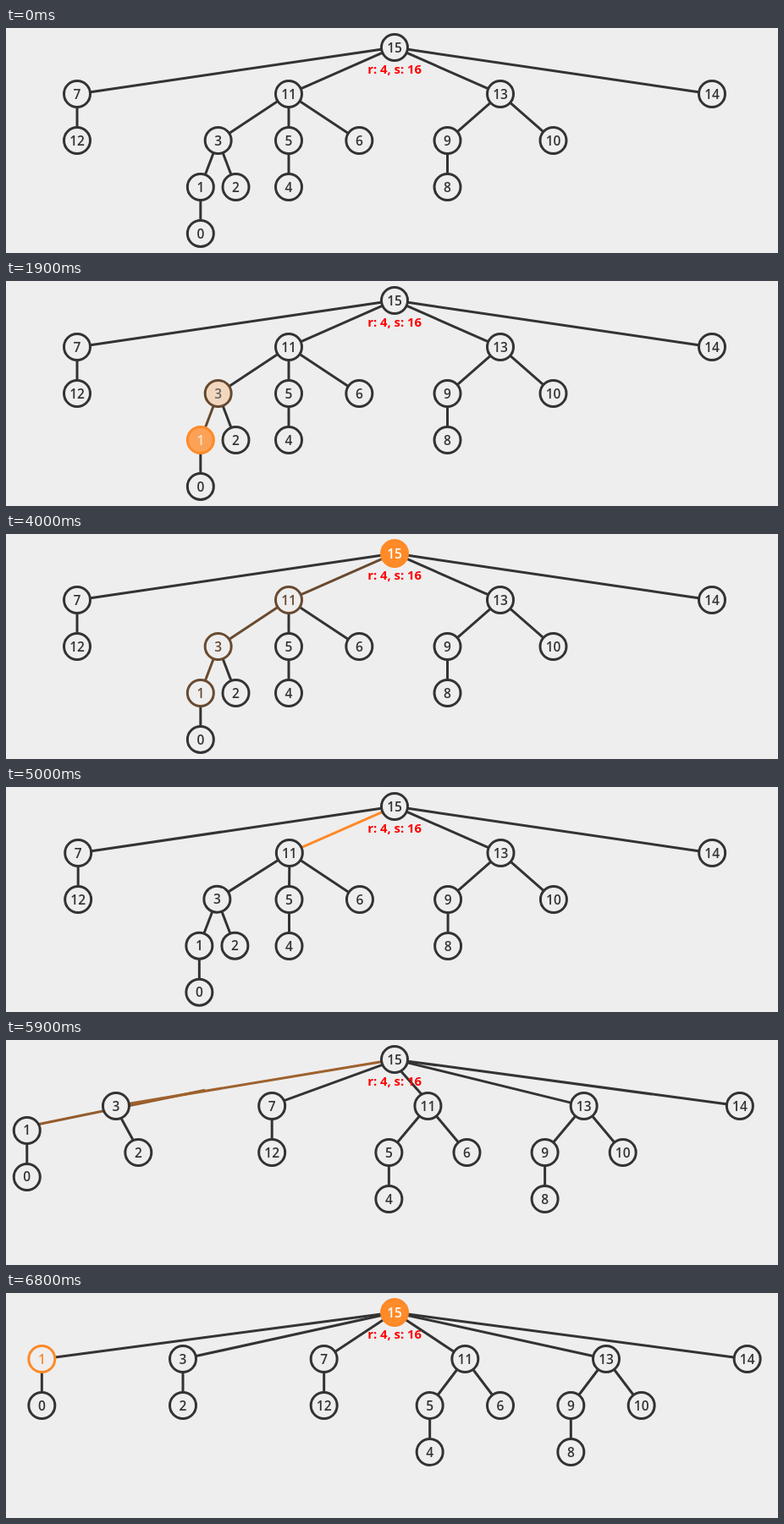
Write an HTML page that moves like this. It is 912 by 266 pixels and loops after 9.3 s.

```html
<!DOCTYPE html>
<html lang="en">
<head>
<meta charset="utf-8">
<title>Path compression</title>
<style>
  html, body { margin: 0; width: 100%; height: 100%; overflow: hidden; background: #eee; }
  svg { display: block; width: 100%; height: 100%; }
  circle, line { stroke-width: 3; }
  text { font: 600 15.5px "Open Sans", "Noto Sans", sans-serif; text-anchor: middle; }
  .label { font-size: 14.8px; font-weight: 700; fill: #f00; }
</style>
</head>
<body>
<svg viewBox="0 0 912 266">
  <g id="edges"></g>
  <g id="nodes"></g>
  <text class="label" x="459" y="54">r: 4, s: 16</text>
</svg>
<script>
const LOOP = 9300, TICK = 100, FIRST_STEP = 986, STEP = 656;
const ROOT = 15, RADIUS = 16;
const DARK = [51, 51, 51], PAPER = [238, 238, 238], ORANGE = [255, 138, 39], WHITE = [255, 255, 255];

// Parent of each node 0..14
const PARENTS = [1, 3, 3, 11, 5, 11, 11, 15, 9, 13, 13, 15, 7, 15, 15];

// full: filled node, ring: outlined nodes, path: lit edges (by child), moved: nodes re-hung under the root
const states = [
  {},
  { full: 1 },
  { full: 3, ring: [1], path: [1] },
  { full: 11, ring: [1, 3], path: [1, 3] },
  { full: 15, ring: [1, 3, 11], path: [1, 3, 11] },
  { full: 15 },
  { path: [11] },
  { path: [3], moved: [3] },
  { path: [1], moved: [1, 3] },
  { full: 15, ring: [1], moved: [1, 3] }
].map(buildState);

// Every node shares its width equally among its children
function layout(parents) {
  const places = [];
  (function place(node, x, y, width) {
    places[node] = [x, y];
    const children = [...parents.keys()].filter(child => parents[child] === node);
    const slot = width / children.length;
    children.forEach((child, i) => place(child, x - width / 2 + slot * (i + 0.5), y + 55, slot));
  })(ROOT, 459, 23, 1000);
  return places;
}

function edgeEnds([x1, y1], [x2, y2]) {
  const k = RADIUS / Math.hypot(x2 - x1, y2 - y1);
  const dx = (x2 - x1) * k, dy = (y2 - y1) * k;
  return [x1 + dx, y1 + dy, x2 - dx, y2 - dy];
}

function buildState({ full, ring = [], path = [], moved = [] }) {
  const parents = PARENTS.map((parent, node) => moved.includes(node) ? ROOT : parent);
  const places = layout(parents);
  return {
    nodes: places.map((at, node) => {
      const ink = ring.includes(node) ? ORANGE : DARK;
      return node === full
        ? { at, fill: ORANGE, stroke: ORANGE, text: WHITE }
        : { at, fill: PAPER, stroke: ink, text: ink };
    }),
    edges: parents.map((parent, node) => ({
      ends: edgeEnds(places[node], places[parent]),
      stroke: path.includes(node) ? ORANGE : DARK
    }))
  };
}

function add(parentId, tag, attrs = {}) {
  const el = document.createElementNS("http://www.w3.org/2000/svg", tag);
  set(el, attrs);
  return document.getElementById(parentId).appendChild(el);
}

function set(el, attrs) {
  for (const name in attrs) el.setAttribute(name, attrs[name]);
}

const lines = PARENTS.map(() => add("edges", "line"));
const nodes = states[0].nodes.map((_, value) => {
  const circle = add("nodes", "circle", { r: 15.5 });
  const text = add("nodes", "text");
  text.textContent = value;
  return { circle, text };
});

const mix = (a, b, p) => a.map((v, i) => v + (b[i] - v) * p);
const color = (a, b, p) => `rgb(${mix(a, b, p).map(Math.round)})`;
const ease = t => t < 0.5 ? 4 * t ** 3 : 1 - 4 * (1 - t) ** 3;

function draw(time) {
  const progress = Math.min(Math.max((time - FIRST_STEP) / STEP, 0), states.length - 1);
  const index = Math.min(Math.floor(progress), states.length - 2);
  const p = ease(progress - index);
  const from = states[index], to = states[index + 1];

  lines.forEach((line, i) => {
    const a = from.edges[i], b = to.edges[i];
    const [x1, y1, x2, y2] = mix(a.ends, b.ends, p);
    set(line, { x1, y1, x2, y2, stroke: color(a.stroke, b.stroke, p) });
  });
  nodes.forEach(({ circle, text }, i) => {
    const a = from.nodes[i], b = to.nodes[i];
    const [x, y] = mix(a.at, b.at, p);
    set(circle, { cx: x, cy: y, fill: color(a.fill, b.fill, p), stroke: color(a.stroke, b.stroke, p) });
    set(text, { x, y: y + 5.5, fill: color(a.text, b.text, p) });
  });
}

function frame() {
  const time = performance.now() % LOOP;
  draw(Math.floor(time / TICK) * TICK);
  requestAnimationFrame(frame);
}
frame();
</script>
</body>
</html>
```
